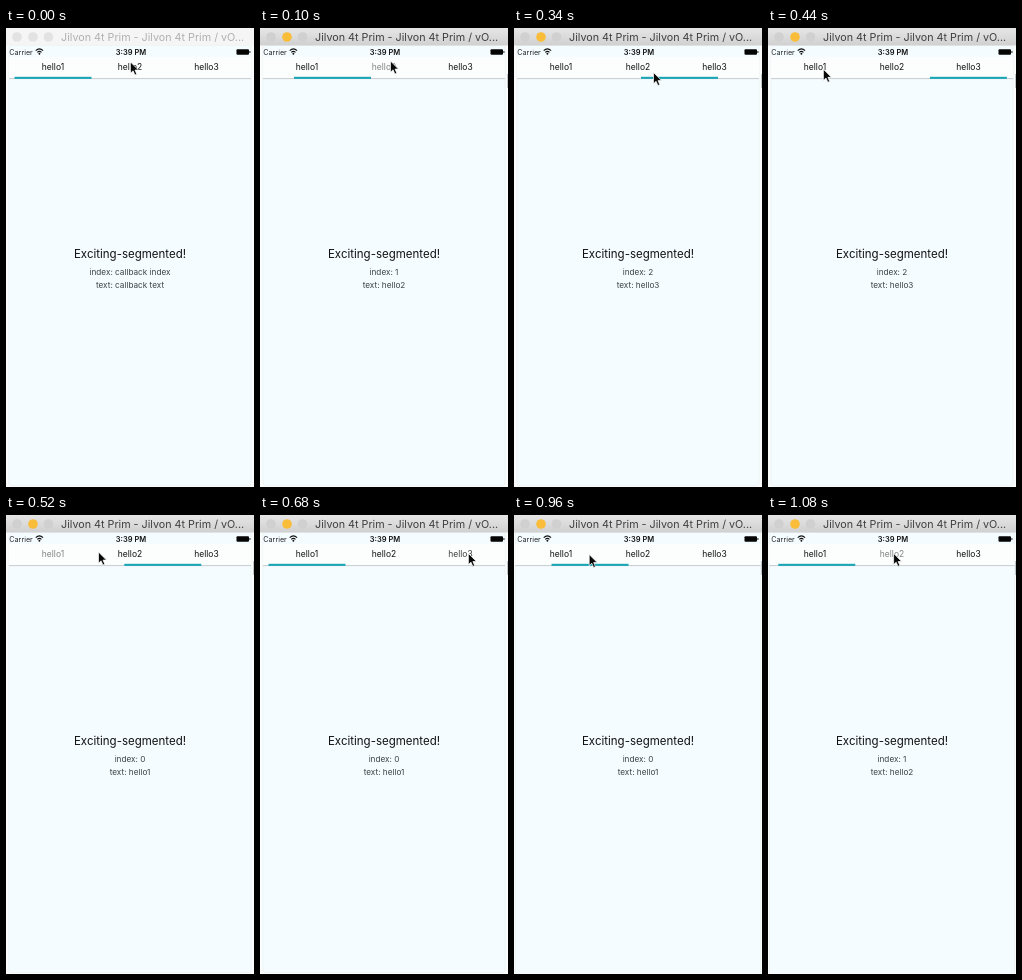
An HTML page for the animation above (1100 ms loop, 248 by 459 pixels).

```html
<!DOCTYPE html>
<html lang="en">
<head>
<meta charset="utf-8">
<style>
  html, body { margin: 0; width: 100%; height: 100%; overflow: hidden; background: #fff; }
  svg { display: block; width: 100vw; height: 100vh; }
  text { font-family: Inter, "Open Sans", sans-serif; }
  .mid { text-anchor: middle; }
</style>
</head>
<body>
<svg viewBox="0 0 248 459">
  <defs>
    <linearGradient id="bar" x1="0" y1="0" x2="0" y2="1">
      <stop offset="0" stop-color="#e6e6e6"/>
      <stop offset="1" stop-color="#d0d0d0"/>
    </linearGradient>
  </defs>
  <rect width="248" height="459" fill="#fbfcfc"/>
  <rect id="page" fill="#f5fcff" stroke="#e7eef0" stroke-width=".6"/>
  <rect id="tabsBg" y="29" height="21" fill="#fcfefe"/>
  <rect id="rule" y="50.2" height=".9" fill="#c0c7c9"/>
  <rect id="edge" x="247" y="46" width="1" height="14" fill="#b5bbbd"/>

  <rect id="titleBar" width="248" height="17.5"/>
  <circle id="close" cx="11" cy="9" r="4.8"/>
  <circle id="minimise" cx="27" cy="9" r="4.8"/>
  <circle id="zoom" cx="42.5" cy="9" r="4.8"/>
  <text id="title" x="55" y="13" font-size="10.75">Jilvon 4t Prim - Jilvon 4t Prim / vO...</text>

  <text x="3.3" y="26.5" font-size="7.2" fill="#222">Carrier</text>
  <g fill="none" stroke="#111" stroke-width="1.1">
    <path d="M29.7 22.7Q33.4 19.2 37.1 22.7M31.3 24.3Q33.4 22.4 35.5 24.3"/>
    <circle cx="33.4" cy="25.8" r=".4"/>
  </g>
  <text x="125" y="26.6" font-size="7.5" font-weight="600" fill="#111" class="mid">3:39 PM</text>
  <rect x="230.5" y="21.2" width="12.5" height="5.6" rx="1" fill="#050505"/>
  <rect x="243.4" y="23" width="1" height="2" fill="#222"/>

  <g id="tabs" font-size="8.5" fill="#111" class="mid">
    <text x="47" y="41.9">hello1</text>
    <text x="124" y="41.9">hello2</text>
    <text x="200.5" y="41.9">hello3</text>
  </g>
  <rect id="underline" y="48.8" width="77" height="2.1" fill="#1ba6b5"/>

  <g class="mid">
    <text x="124" y="230" font-size="11.5" fill="#111">Exciting-segmented!</text>
    <text id="indexLine" x="124" y="246.8" font-size="8.2" fill="#3c4144"/>
    <text id="textLine" x="124" y="259.8" font-size="8.2" fill="#3c4144"/>
  </g>
  <path id="cursor" d="M0 0V11.2L2.6 8.8L4.4 13L6.3 12.2L4.5 8.1H8Z"
        fill="#080808" stroke="#fff" stroke-width=".7"/>
</svg>
<script>
const LOOP = 1100, SLIDE = 130, STEP = 20;
const $ = id => document.getElementById(id);
const set = (id, attrs) => {
  for (const key in attrs) $(id).setAttribute(key, attrs[key]);
};

// Each tap: time and chosen tab
const taps = [[47, 1], [272, 2], [471, 0], [688, 2], [870, 0], [1066, 1]];
// Pointer path: time, x, y
const path = [
  [0, 124.5, 34], [100, 130.5, 33], [180, 160, 36], [260, 203, 40],
  [285, 200, 41], [340, 139.5, 44.5], [420, 57, 42], [470, 53, 40],
  [520, 92.5, 37], [600, 180, 38], [680, 208.4, 38.4], [730, 203, 40],
  [820, 56.4, 39.5], [900, 50, 40], [1080, 125.6, 38.4], [1100, 126, 38]
];

const clamp = v => Math.max(0, Math.min(1, v));
const mix = (a, b, p) => a + (b - a) * p;
const ease = p => p < .5 ? 2 * p * p : 1 - 2 * (1 - p) ** 2;
const tabX = i => 8.5 + 76.7 * i;

function pointerAt(t) {
  const i = path.findIndex(k => k[0] > t);
  const [t0, x0, y0] = path[i - 1], [t1, x1, y1] = path[i];
  const p = (t - t0) / (t1 - t0);
  return [mix(x0, x1, p), mix(y0, y1, p)];
}

function underlineAt(t) {
  let x = tabX(0);
  for (const [start, tab] of taps) {
    x = mix(x, tabX(tab), ease(clamp((t - start) / SLIDE)));
  }
  return x;
}

function tabOpacity(tab, t) {
  let opacity = 1;
  for (const [start, target] of taps) {
    if (target !== tab) continue;
    const d = t - start;
    const press = clamp((d + 12) / 10) * clamp((68 - d) / 14);
    opacity -= .48 * press;
  }
  return opacity;
}

function drawWindow(t) {
  const active = t >= 40, wide = t >= 700;
  const left = wide ? 1.3 : 3, width = wide ? 245.2 : 242;
  set('page', { x: left, y: 17.5, width, height: wide ? 445 : 440, rx: wide ? 0 : 2 });
  set('tabsBg', { x: left, width });
  set('rule', { x: left, width });
  set('edge', { opacity: active ? .8 : 0 });
  set('titleBar', { fill: active ? 'url(#bar)' : '#f5f5f5' });
  set('title', { fill: active ? '#3f3f3f' : '#b0b0b0' });
  const idle = active ? '#d0d0d0' : '#e2e2e2';
  set('close', { fill: idle });
  set('zoom', { fill: idle });
  set('minimise', { fill: active ? '#f9bd3a' : idle });
}

function draw(t) {
  drawWindow(t);
  const last = taps.filter(tap => tap[0] <= t).pop();
  $('indexLine').textContent = 'index: ' + (last ? last[1] : 'callback index');
  $('textLine').textContent = 'text: ' + (last ? 'hello' + (last[1] + 1) : 'callback text');
  [...$('tabs').children].forEach((el, i) => el.setAttribute('opacity', tabOpacity(i, t)));
  set('underline', { x: underlineAt(t) });
  set('cursor', { transform: `translate(${pointerAt(t)})` });
}

const origin = performance.now();
function tick() {
  const t = (performance.now() - origin) % LOOP;
  draw(Math.floor(t / STEP) * STEP);
  requestAnimationFrame(tick);
}
draw(0);
requestAnimationFrame(tick);
</script>
</body>
</html>
```
